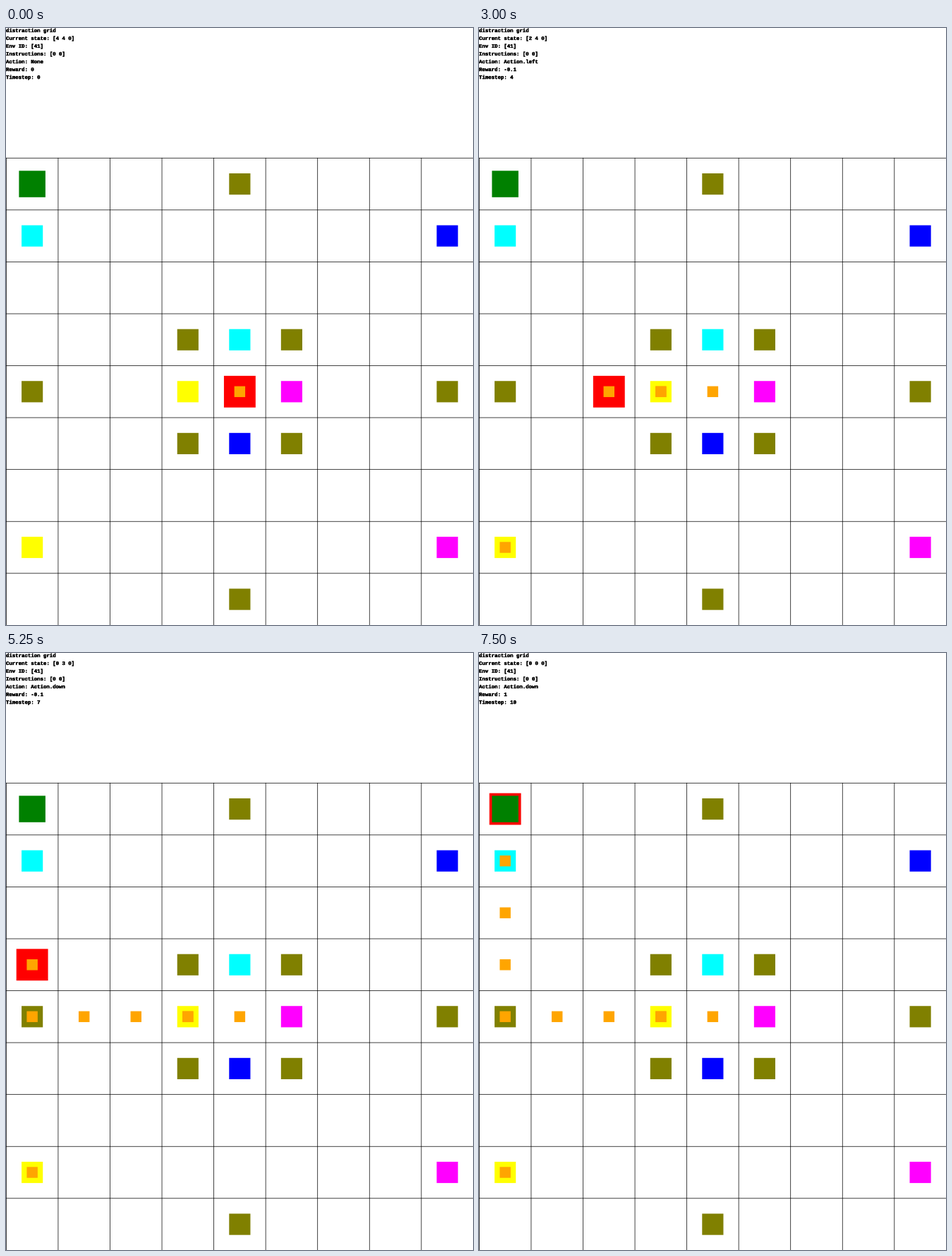
A matplotlib script for the animation above (8250 ms loop, 662x846 px).

```python
import matplotlib.pyplot as plt
from matplotlib.animation import FuncAnimation
from matplotlib.patches import Rectangle
from matplotlib.patheffects import withStroke

W, H, DPI = 662, 846, 64

# Board units: 9 x 9 cells of 100 below a header of 250.
N, CELL, TOP = 9, 100, 250
SIDE = N * CELL
FONT, LINE, BASELINE = 10, 15, 8

GOAL = (0, 0)
PATH = [(4, 4), (3, 4), (0, 7), (3, 4), (2, 4), (1, 4),
        (0, 4), (0, 3), (0, 2), (0, 1), GOAL]
ACTIONS = (["None", "Action.left"] + ["Action.ride_bus"] * 2
           + ["Action.left"] * 3 + ["Action.down"] * 4)
STOPS = {
    "yellow": [(0, 7), (3, 4)],
    "cyan": [(0, 1), (4, 3)],
    "magenta": [(8, 7), (5, 4)],
    "blue": [(8, 1), (4, 5)],
    "olive": [(4, 0), (3, 3), (5, 3), (0, 4), (8, 4), (3, 5), (5, 5), (4, 8)],
}
STOP_CELLS = {cell for cells in STOPS.values() for cell in cells}

fig = plt.figure(figsize=(W / DPI, H / DPI), dpi=DPI, facecolor="white")
ax = fig.add_axes([0, 0, 1, 1])
ax.set_xlim(0, SIDE)
ax.set_ylim(TOP + SIDE, 0)
ax.axis("off")


def box(x, y, w, h, color, z):
    return ax.add_patch(Rectangle((x, y), w, h, facecolor=color, linewidth=0,
                                  edgecolor="none", snap=False, zorder=z))


def block(cell, size, color, z):
    """Square centred in a cell, with both end pixels included."""
    x, y = (CELL * i + (CELL - size) / 2 for i in cell)
    return box(x, TOP + y, size + 1, size + 1, color, z)


for k in range(N):
    box(k * CELL, TOP, 1, SIDE, "black", 1)
    box(0, TOP + k * CELL, SIDE, 1, "black", 1)

agents = [block(cell, 60, "red", 2) for cell in PATH]
for color, cells in STOPS.items():
    for cell in cells:
        block(cell, 40, color, 3)
trail = [block(cell, 20, "orange", 4) for cell in PATH]
block(GOAL, 50, "green", 5)

font_pt = FONT * W / SIDE * 72 / DPI
heavier = [withStroke(linewidth=0.35, foreground="black")]
labels = [ax.text(0, BASELINE + LINE * i, "", family="Liberation Mono",
                  weight="bold", size=font_pt, color="black", va="baseline",
                  ha="left", path_effects=heavier, zorder=6)
          for i in range(7)]


def reward(t):
    if t == 0:
        return "0"
    return "1" if PATH[t] == GOAL else "-0.1"


def update(t):
    x, y = PATH[t]
    at_stop = int((x, y) in STOP_CELLS)
    lines = [
        "distraction grid",
        f"Current state: [{x} {y} {at_stop}]",
        "Env ID: [41]",
        "Instructions: [0 0]",
        f"Action: {ACTIONS[t]}",
        f"Reward: {reward(t)}",
        f"Timestep: {t}",
    ]
    for label, line in zip(labels, lines):
        label.set_text(line)
    for i, (agent, mark) in enumerate(zip(agents, trail)):
        agent.set_visible(i == t)
        mark.set_visible(i <= t)
    return labels + agents + trail


anim = FuncAnimation(fig, update, frames=len(PATH), interval=750,
                     repeat=True, repeat_delay=0, blit=False)
plt.show()
```
